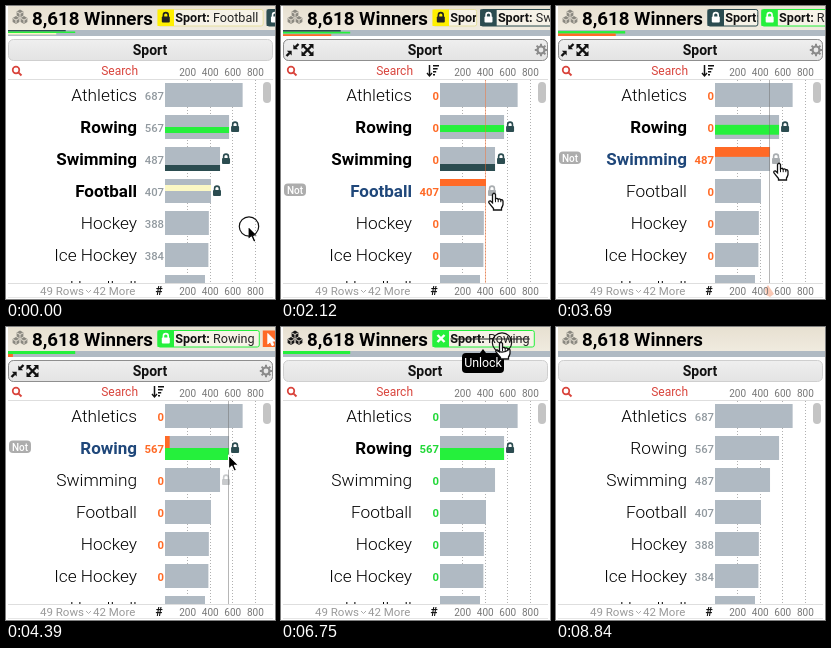
An HTML page with a canvas that plays this animation: 269 px wide and 293 px high, repeating every 9310 ms.

```html
<!DOCTYPE html>
<html lang="en">
<head>
<meta charset="utf-8">
<title>Winners by sport</title>
<style>
html, body { margin: 0; width: 100%; height: 100%; overflow: hidden; background: #fff; }
canvas { display: block; width: 269px; height: 293px; }
</style>
</head>
<body>
<canvas id="stage"></canvas>
<script>
const W = 269, H = 293, LOOP = 9310;
const canvas = document.getElementById('stage');
const ratio = window.devicePixelRatio || 1;
canvas.width = W * ratio;
canvas.height = H * ratio;
const c = canvas.getContext('2d');

const GREY = '#b0bac3', ORANGE = '#ff6a26', GREEN = '#25f03c', DARK = '#2b4c50', YELLOW = '#fff000';
const LEFT = 159, UNIT = 0.113, PITCH = 32, BAR = 24;
const STRIP = { top: 24, height: 6 };
const rows = [['Athletics', 687], ['Rowing', 567], ['Swimming', 487], ['Football', 407],
  ['Hockey', 388], ['Ice Hockey', 384], ['Handball', 354]];

// Locked rows, in breadcrumb order; off = when the unlocking runs
const locks = [
  { row: 3, color: YELLOW, band: '#fbf8c4', off: [1860, 2350], fade: [2600, 2900], open: 1150 },
  { row: 2, color: DARK, band: DARK, off: [3425, 3925], fade: [4330, 4500], open: 2600 },
  { row: 1, color: GREEN, band: GREEN, off: [7050, 7400], fade: [7050, 7400], open: Infinity }
];

// Hovered row over time: start, end, row
const hovers = [[420, 1170, 4], [1170, 2415, 3], [2415, 4330, 2], [4330, 4530, 1], [4530, 4700, 0]];
for (let r = 0; r < 7; r++) hovers.push([8490 + 44 * r, 8534 + 44 * r, r]);

// Pointer path: time, x, y
const path = [[0, 242, 220], [420, 242, 220], [1080, 216, 205], [1200, 213, 187], [2150, 213, 187],
  [2620, 223, 157], [4100, 223, 157], [4980, 221, 25], [5690, 221, 25], [5860, 220, 15],
  [8410, 220, 15], [8800, 232, 296], [LOOP, 232, 310]];
const clicks = [[0, 60], [1740, 1860], [3320, 3440], [6750, 6870]];

const clamp = v => Math.max(0, Math.min(1, v));
const ramp = (t, a, b) => clamp((t - a) / (b - a));
const ease = p => p < 0.5 ? 2 * p * p : 1 - 2 * (1 - p) * (1 - p);
const within = (t, a, b) => t >= a && t < b;
const crisp = x => Math.floor(x) + 0.5;

function rect(x, y, w, h, fill) {
  c.fillStyle = fill;
  c.fillRect(x, y, w, h);
}

function round(x, y, w, h, r, fill, stroke) {
  c.beginPath();
  c.roundRect(x, y, w, h, r);
  if (fill) { c.fillStyle = fill; c.fill(); }
  if (stroke) { c.strokeStyle = stroke; c.lineWidth = 1; c.stroke(); }
}

function text(s, x, y, size, color, weight = 400, align = 'left') {
  c.font = `${weight} ${size}px Roboto, sans-serif`;
  c.textAlign = align;
  c.fillStyle = color;
  c.fillText(s, x, y);
}

function line(points, color, width = 1) {
  c.beginPath();
  points.forEach(([x, y], i) => i ? c.lineTo(x, y) : c.moveTo(x, y));
  c.strokeStyle = color;
  c.lineWidth = width;
  c.stroke();
}

function at(x, y, draw, alpha = 1) {
  if (alpha <= 0) return;
  c.save();
  c.translate(x, y);
  c.globalAlpha *= alpha;
  draw();
  c.restore();
}

function lockIcon(x, y, color, open, alpha = 1) {
  at(x, y, () => {
    round(-4, -0.5, 8, 6, 1, color);
    c.beginPath();
    c.moveTo(-2.4, open ? -1.5 : 0);
    c.lineTo(-2.4, -2);
    c.arc(0, -2, 2.4, Math.PI, 0);
    if (!open) c.lineTo(2.4, 0);
    else { c.moveTo(-2.4, -2); c.lineTo(-2.4, 0); }
    c.strokeStyle = color;
    c.lineWidth = 1.6;
    c.stroke();
  }, alpha);
}

function cubes(color) {
  const cube = (x, y) => {
    c.beginPath();
    for (let i = 0; i < 6; i++) {
      const a = Math.PI * (i / 3 + 1 / 6);
      c.lineTo(x + 3.9 * Math.cos(a), y + 3.9 * Math.sin(a));
    }
    c.closePath();
    c.fillStyle = color;
    c.fill();
    line([[x - 3, y - 1.5], [x, y], [x + 3, y - 1.5]], '#ece6d9', 0.9);
    line([[x, y], [x, y + 3.4]], '#ece6d9', 0.9);
  };
  cube(14, 7.5);
  cube(10, 14);
  cube(18, 14);
}

function gear(x, y) {
  c.strokeStyle = '#8b8b8b';
  c.lineWidth = 2.2;
  c.beginPath();
  c.arc(x, y, 3.5, 0, 7);
  c.stroke();
  for (let i = 0; i < 8; i++) {
    const a = i * Math.PI / 4, u = Math.cos(a), v = Math.sin(a);
    line([[x + 4 * u, y + 4 * v], [x + 6.2 * u, y + 6.2 * v]], '#8b8b8b', 2);
  }
}

// Diagonal arrows, pointing outwards or inwards
function arrows(x, y, dirs, outward) {
  for (const [u, v] of dirs) {
    const tip = outward ? 6 : 0.8, tail = outward ? 0 : 6, back = outward ? 1 : 5.6;
    line([[x + u * tail, y + v * tail], [x + u * 4, y + v * 4], [x + u * 3, y + v * 3]], '#111', 2.4);
    c.beginPath();
    c.moveTo(x + u * tip, y + v * tip);
    c.lineTo(x + u * back, y + v * tip);
    c.lineTo(x + u * tip, y + v * back);
    c.fillStyle = '#111';
    c.fill();
  }
}

function sortIcon() {
  line([[148.5, 59], [148.5, 69]], '#111', 1.5);
  line([[146, 67], [148.5, 70], [151, 67]], '#111', 1.4);
  [6, 4.6, 3.2, 2].forEach((w, i) => rect(152, 59 + i * 3, w, 1.5, '#111'));
}

function tooltip(x, y, alpha, tail) {
  at(x, y, () => {
    round(0, 0, tail === 'left' ? 46 : 42, 20, 4, '#000');
    c.beginPath();
    if (tail === 'left') { c.moveTo(0, 7); c.lineTo(-4, 10); c.lineTo(0, 13); }
    else { c.moveTo(18, 0); c.lineTo(21, -4); c.lineTo(24, 0); }
    c.fill();
    text('Unlock', tail === 'left' ? 23 : 21, 14.3, 12.4, '#fff', 400, 'center');
  }, alpha);
}

function chip(lock, x, t) {
  const name = rows[lock.row][0], size = 12.6;
  c.font = `700 ${size}px Roboto, sans-serif`;
  const head = c.measureText('Sport:').width;
  c.font = `400 ${size}px Roboto, sans-serif`;
  const full = head + c.measureText(' ' + name).width;
  const width = full + 26;
  const shown = width * (1 - ease(ramp(t, ...lock.off)));
  if (shown < 1) return 0;
  const struck = lock.color === GREEN && t >= 5750;
  const box = Math.max(17, shown - 4);
  c.save();
  c.beginPath();
  c.rect(x - 1, 2, shown - 1.5, 20);
  c.clip();
  round(x + 0.5, 3.5, box, 16.5, 2, '#f6f2e7', lock.color === YELLOW ? '#e5dfa0' : lock.color);
  rect(x, 3.5, 16.5, 16.5, lock.color);
  if (struck) {
    line([[x + 5, 8], [x + 12, 15]], '#fff', 2.4);
    line([[x + 12, 8], [x + 5, 15]], '#fff', 2.4);
  } else lockIcon(x + 8.3, 11, lock.color === YELLOW ? '#222' : '#fff');
  c.beginPath();
  c.rect(x, 2, box, 20);
  c.clip();
  text('Sport:', x + 17.7, 16, size, '#111', 700);
  text(' ' + name, x + 17.7 + head, 16, size, '#222');
  if (struck) line([[x + 18, 12], [x + 18 + full, 12]], '#222', 1.1);
  c.restore();
  return shown;
}

function header(t, hover, grow, bands) {
  const beige = c.createLinearGradient(0, 0, 0, STRIP.top);
  beige.addColorStop(0, '#e7e0d1');
  beige.addColorStop(1, '#f0ebdf');
  rect(2, 0, W, STRIP.top, beige);
  cubes(within(t, 4900, 8440) ? '#151515' : '#8b8981');
  text('8,618 Winners', 26, 18.5, 18.7, '#000', 700);

  rect(2, STRIP.top, W, STRIP.height, GREY);
  const strip = (band, value, color) => {
    const h = STRIP.height / bands.count;
    rect(2, STRIP.top + STRIP.height - (band + 1) * h, value * 0.1185, h, color);
  };
  locks.forEach((lock, i) => {
    if (t < lock.off[0]) strip(bands.index[i], rows[lock.row][1], lock.band);
  });
  if (hover) strip(0, rows[hover[2]][1] * grow, ORANGE);

  let x = 151.5;
  for (const lock of locks) x += chip(lock, x, t);
  at(x, 3.5, () => {
    rect(0, 0, 16.5, 16.5, ORANGE);
    at(5, 3, () => pointer('#fff', '#fff', 0.75));
  }, within(t, 420, 5920) ? 1 - ramp(t, 5690, 5850) : 0);
}

function pointer(fill, edge, scale = 1) {
  c.scale(scale, scale);
  c.beginPath();
  [[0, 0], [0, 14], [3.3, 11], [5.6, 16.2], [8, 15.2], [5.8, 10.2], [10, 10]]
    .forEach(([x, y]) => c.lineTo(x, y));
  c.closePath();
  c.fillStyle = fill;
  c.strokeStyle = edge;
  c.lineWidth = 1.2;
  c.lineJoin = 'round';
  c.fill();
  c.stroke();
}

const handShape = new Path2D('M-1.5 1.5Q0-1 1.5 1.5V6Q3 4.8 4.2 6.3Q5.6 5.3 6.8 6.9Q8.6 6.3 9 8.2V11.5' +
  'Q8.6 13.5 7.5 15V17H-.5V15.5Q-3 12.5-5.2 9.6Q-5.5 7.6-3.4 8L-1.5 9.8Z');

function hand() {
  c.fillStyle = '#fff';
  c.strokeStyle = '#111';
  c.lineWidth = 1.3;
  c.fill(handShape);
  c.stroke(handShape);
  for (const x of [1.5, 4.2, 6.8]) line([[x, 6], [x, 9.2]], '#111');
}

function titleBar(t) {
  const active = t < 8400 ? ramp(t, 420, 600) * (1 - ramp(t, 4850, 5330))
    : ramp(t, 8450, 8560) * (1 - ramp(t, 8720, 8820));
  const shade = c.createLinearGradient(0, 33, 0, 55);
  shade.addColorStop(0, '#efefef');
  shade.addColorStop(1, '#e3e3e3');
  round(2.5, 33.5, 264, 21, 5, shade, '#cfcfcf');
  text('Sport', 144, 49.3, 14, '#111', 700, 'center');
  at(0, 0, () => {
    round(2.5, 33.5, 264, 21, 5, null, '#8f8f8f');
    arrows(11.5, 44, [[1, -1], [-1, 1]], false);
    arrows(26.5, 44, [[1, -1], [-1, 1], [1, 1], [-1, -1]], true);
    gear(260, 44);
  }, active);
}

function axis(y) {
  for (let v = 200; v <= 800; v += 200) text(v, LEFT + v * UNIT, y, 10, '#777', 400, 'center');
}

function chart(t, hover, grow, bands) {
  c.strokeStyle = '#d9453d';
  c.lineWidth = 1.7;
  c.beginPath();
  c.arc(10, 64, 3.3, 0, 7);
  c.stroke();
  line([[12.3, 66.4], [15.5, 69.5]], '#d9453d', 2);
  text('Search', 132, 69.3, 12, '#d9453d', 400, 'right');
  axis(69.5);
  if (hover) sortIcon();
  line([[2, 73.5], [267, 73.5]], '#dedede');

  c.save();
  c.beginPath();
  c.rect(0, 73, W, 204);
  c.clip();
  c.setLineDash([1, 2]);
  for (let v = 200; v <= 800; v += 200) {
    const x = crisp(LEFT + v * UNIT);
    line([[x, 74], [x, 277]], '#b0b0b0');
  }
  c.setLineDash([]);

  const crumb = within(t, 5750, 7050);
  rows.forEach(([name, value], r) => {
    const y = 77 + PITCH * r, mid = y + 12, end = LEFT + value * UNIT;
    const active = hover && hover[2] === r;
    const lock = locks.find(l => l.row === r);
    const locked = lock && t < lock.off[0];
    const strong = active || locked;
    const match = active || (crumb && r === 1);
    const h = BAR / bands.count;
    rect(LEFT, y, value * UNIT, BAR, GREY);
    if (locked) rect(LEFT, y + bands.index[locks.indexOf(lock)] * h, value * UNIT, h, lock.band);
    if (active) rect(LEFT, y, value * UNIT * grow, h, ORANGE);
    text(name, 131, mid + 6, strong ? 17 : 17.3, active ? '#1f477a' : '#000', strong ? 700 : 300, 'right');
    const compared = hover || crumb;
    text(compared && !match ? 0 : value, 158, mid + 4.5, 11.3,
      crumb ? '#22d838' : hover ? ORANGE : '#929aa0', compared ? 700 : 500, 'right');
    if (active) {
      round(3, mid - 7.5, 22, 12.5, 4, '#adadad');
      text('Not', 14, mid + 2.5, 10, '#fff', 500, 'center');
    }
    if (lock) {
      const color = locked ? DARK : '#a9adb0';
      lockIcon(end + 6, mid - 0.5, color, locked && t >= lock.open, 1 - ramp(t, ...lock.fade));
    }
  });
  if (hover && t < 8400) {
    const x = crisp(LEFT + rows[hover[2]][1] * UNIT - 0.5);
    line([[x, 74], [x, 277]], hover[2] === 3 ? 'rgba(255,106,38,.45)' : 'rgba(110,110,110,.5)');
  }
  c.restore();

  round(257, 76, 8, 21, 4, '#c4c4c4');
  line([[2, 277.5], [267, 277.5]], '#dedede');
  line([[2, 291.5], [267, 291.5]], '#e6e6e6');
  text('49 Rows', 34, 289, 11.5, '#9a9a9a');
  line([[80, 284], [82.5, 286.5], [85, 284]], '#aaa');
  text('42 More', 87, 289, 11.5, '#9a9a9a');
  text('#', 153, 289, 12, '#111', 700, 'center');
  if (hover && hover[2] === 2 && t - hover[0] > 200) {
    c.beginPath();
    [[209, 283], [212, 279], [218, 288], [214, 291], [210, 289]].forEach(([x, y]) => c.lineTo(x, y));
    c.fillStyle = '#fbc8b4';
    c.fill();
  }
  axis(288.5);
}

function cursor(t) {
  const i = Math.max(1, path.findIndex(k => k[0] > t));
  const [t0, x0, y0] = path[i - 1], [t1, x1, y1] = path[i];
  const p = ease(ramp(t, t0, t1));
  const x = x0 + (x1 - x0) * p, y = y0 + (y1 - y0) * p;
  if (t < 8810) {
    const pointing = within(t, 1150, 2200) || within(t, 2580, 4150) || within(t, 5750, 7150);
    at(x, y, () => pointing ? hand() : pointer('#000', '#fff'));
  }
  if (clicks.some(([a, b]) => within(t, a, b))) {
    c.beginPath();
    c.arc(x + 1, y + 0.5, 9.7, 0, 7);
    c.strokeStyle = '#111';
    c.lineWidth = 1.2;
    c.stroke();
  }
}

function draw(t) {
  c.setTransform(ratio, 0, 0, ratio, 0, 0);
  rect(0, 0, W, H, '#fff');
  const gone = locks.map(l => ease(ramp(t, ...l.off)));
  const bands = {
    count: 4 - gone[0] - gone[1] - gone[2],
    index: [1, 3 - gone[0], 2 - gone[0]]
  };
  const hover = hovers.find(([a, b]) => within(t, a, b));
  const grow = hover ? ease(ramp(t, hover[0], hover[0] + 320)) : 0;
  header(t, hover, grow, bands);
  titleBar(t);
  chart(t, hover, grow, bands);
  if (t < 1860) tooltip(218, 176, ramp(t, 1150, 1250), 'left');
  else if (t < 3440) tooltip(226.5, 144, ramp(t, 2635, 2785), 'left');
  else if (t < 7050) tooltip(181, 26, ramp(t, 5750, 5900), 'top');
  cursor(t);
}

const start = performance.now();
function tick() {
  draw((performance.now() - start) % LOOP);
  requestAnimationFrame(tick);
}
tick();
</script>
</body>
</html>
```
